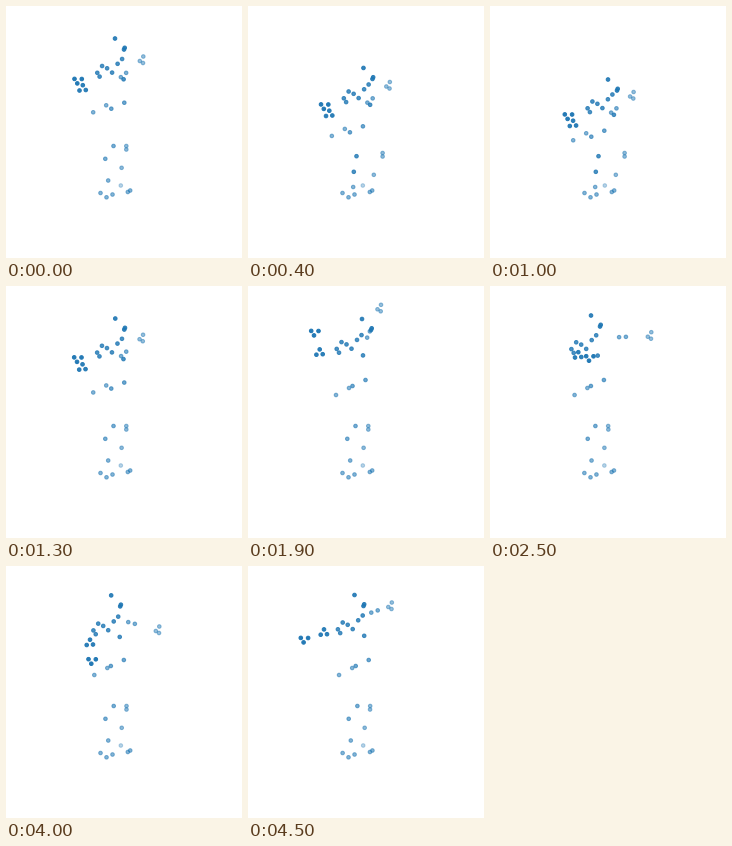
These frames come from a looping animation (236 by 252 pixels, 5800 ms). A matplotlib script:

```python
import matplotlib.pyplot as plt
import numpy as np
from matplotlib.animation import FuncAnimation
from matplotlib.colors import to_rgb

W, H, DPI = 236, 252, 72
STEP, LOOP = 100, 5800
BLUE = to_rgb("tab:blue")

# The picture updates at these times (ms) and holds in between.
UPDATES = np.array([*range(0, 1400, 100), 1500, 1800, 1900, 2200, 2300,
                    2500, 2600, 2700, 2900, 3000, 3200, 3300, 3600,
                    3900, 4000, 4300, 4400, 4500])

# Marker clusters around each joint
HEAD = [(0, 0), (9.7, 9.3), (9, 11)]
CHEST = [(3.5, -3), (-1.5, -5.3), (8.5, 1.3), (-6.3, 1.5), (-4, 5.3),
         (20, 8), (18.5, -12.3), (14, -7.5)]
NEAR_HAND = [(-3.5, -1.8), (3.8, -1.7), (-0.7, 2.7)]
NEAR_ELBOW = [(0, -3.3), (-3.3, 2), (3, 1.5)]
FAR_HAND = [(1.3, -3.5), (-2.2, 1), (1, 3)]
FRONT_HIP = [(88, 109), (101, 102)]
BACK_HIP = [(104.5, 100), (117.5, 94)]
FEET = [(94.5, 187), (100.5, 191.3), (106.5, 188.5),
        (121.8, 186), (124.2, 184.5)]


def ease(t, start, end):
    u = np.clip((t - start) / (end - start), 0, 1)
    return u * u * (3 - 2 * u)


def path(t, *keys):
    """Eased travel through (time, x, y) keys."""
    pos = np.array(keys[0][1:], float)
    for (t0, *a), (t1, *b) in zip(keys, keys[1:]):
        pos += ease(t, t0, t1) * np.subtract(b, a)
    return pos


def squat(t, down):
    return ease(t, down - 400, down) * (1 - ease(t, 1000, 1200))


def upper_body(t):
    bend = squat(t, 540)
    drop = bend * np.array([6.3, 35.5])
    head = path(t, (1200, 109, 32.5), (1900, 114, 33), (2500, 101, 29.5),
                (3300, 103, 30), (4500, 106.5, 29)) + bend * np.array([9, 41])
    chest = drop + path(t, (1200, 97.6, 65.3), (1900, 95, 61.4),
                        (2500, 87.7, 61.6), (3300, 89.6, 64.8),
                        (4500, 96.2, 61.8))
    near_elbow = drop + path(t, (1200, 76.8, 82.5), (1900, 71.7, 66.7),
                             (2500, 88.3, 69.5), (3300, 83, 92),
                             (4000, 84, 77), (4500, 76, 66.7))
    near_hand = drop + path(t, (1200, 72, 74.7), (1900, 66.7, 46.7),
                            (2500, 99.7, 72), (3300, 81.2, 119.5),
                            (4000, 86, 95), (4500, 56.3, 73.7))
    far_elbow = drop + path(t, (1200, 117.5, 69), (1900, 120.5, 48.5),
                            (2500, 132.5, 51), (3300, 124, 76),
                            (4500, 126.5, 45.5))
    far_hand = drop + path(t, (1200, 136, 54), (1900, 131.7, 22.3),
                           (2200, 139, 14), (2500, 160, 49.7),
                           (2700, 145, 63), (3300, 139.5, 97.5),
                           (4000, 152, 64), (4500, 142.5, 40))
    # the far elbow pair lies along the forearm
    arm = far_hand - far_elbow
    arm *= 3.4 / np.hypot(*arm)
    return [(head + HEAD, 0.9), (chest + CHEST, 0.8),
            (near_elbow + NEAR_ELBOW, 0.93), (near_hand + NEAR_HAND, 0.97),
            (far_elbow + [arm, -arm], 0.58), (far_hand + FAR_HAND, 0.48)]


def lower_body(t):
    bend, knee = squat(t, 500), squat(t, 400)
    tilt = 1 - ease(t, 1200, 1900)
    sway = path(t, (1900, 0, 0), (2500, -3.6, 0), (3300, -4.4, 0),
                (4500, 3.2, 0))[0]

    def limb(points, fold, amount, alpha):
        p = np.array(points, float)
        p[:, 0] += sway * np.clip((190 - p[:, 1]) / 85, 0, 1)
        return p + amount * np.array(fold), alpha

    front, back = (limb(hip, (-4, 28), bend, alpha)
                   for hip, alpha in ((FRONT_HIP, 0.55), (BACK_HIP, 0.65)))
    lean = tilt * np.array([0.8, 2.7])
    near = 0.6 + 0.2 * knee
    return [(front[0] - lean, front[1]), (back[0] + lean, back[1]),
            limb([(107.5, 140)], (1, 10.2), knee, near),
            limb([(99.3, 152.8)], (6.5, 13), knee, near),
            limb([(102.2, 174.5)], (3, 6.5), knee, 0.55),
            limb([(120.3, 140), (120.3, 143.5)], (14.3, 7), knee, 0.5),
            limb([(115.6, 161.8)], (10.2, 7), knee, 0.5),
            limb([(114.8, 179.5)], (0, 0), 0, 0.32),
            limb(FEET, (0, 0), 0, 0.55)]


def markers(t):
    groups = sorted(upper_body(t) + lower_body(t), key=lambda g: g[1])
    points = np.concatenate([p for p, _ in groups])
    colors = [(*BLUE, a) for p, a in groups for _ in p]
    return points, colors


fig = plt.figure(figsize=(W / DPI, H / DPI), dpi=DPI, facecolor="white")
ax = fig.add_axes([0, 0, 1, 1])
ax.set(xlim=(0, W), ylim=(H, 0))
ax.axis("off")
points, colors = markers(0)
dots = ax.scatter(*points.T, c=colors, s=13, linewidths=1, edgecolors="face")


def draw(i):
    t = UPDATES[UPDATES <= i * STEP][-1]
    points, colors = markers(t)
    dots.set_offsets(points)
    dots.set_facecolors(colors)
    return (dots,)


anim = FuncAnimation(fig, draw, frames=LOOP // STEP, interval=STEP,
                     repeat=True, repeat_delay=0)
plt.show()
```
